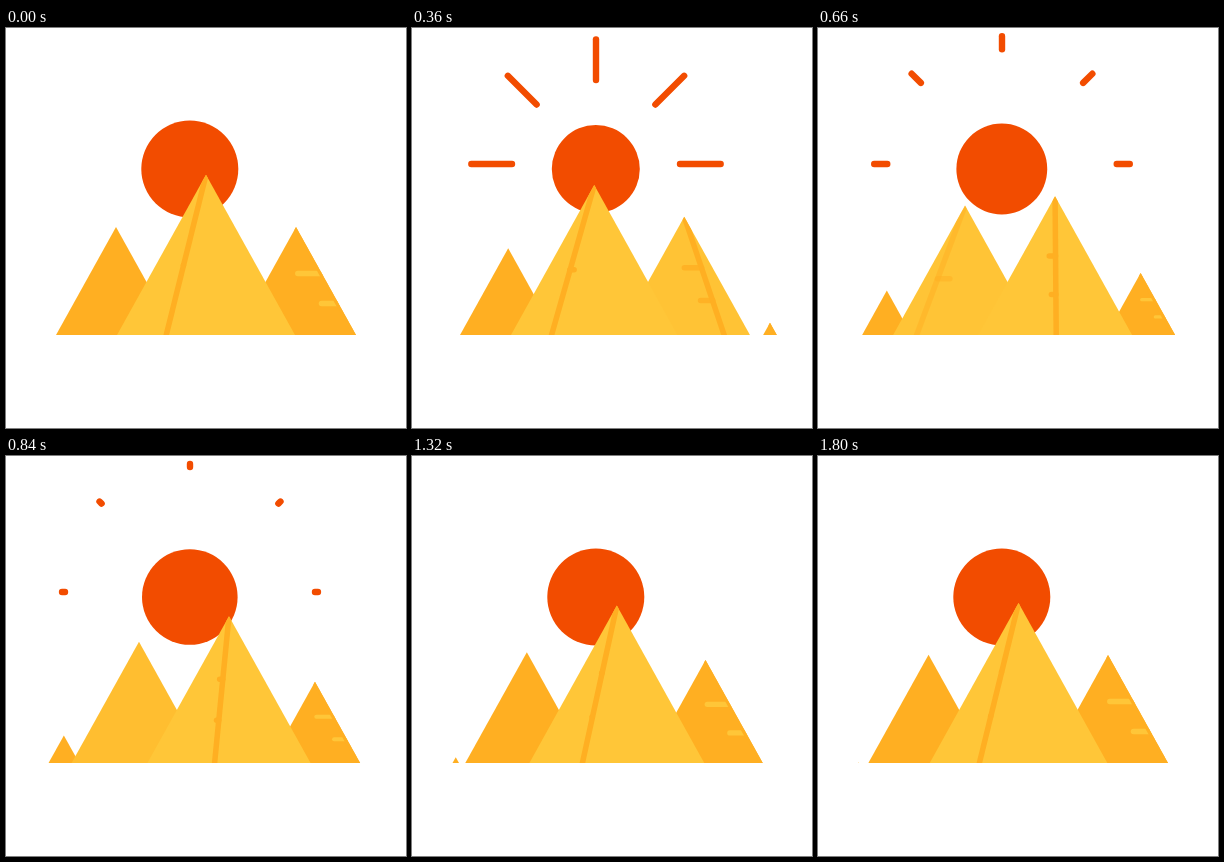
Recreate the animation shown at these times as an HTML page with a canvas. Size 400 by 400 pixels, loop 3.83 s.

```html
<!DOCTYPE html>
<html lang="en">
<head>
<meta charset="utf-8">
<title>Pyramids</title>
<style>
  html, body { margin: 0; width: 100%; height: 100%; overflow: hidden; background: #fff; }
  canvas { display: block; width: 100vmin; height: 100vmin; }
</style>
</head>
<body>
<canvas width="400" height="400"></canvas>
<script>
const ctx = document.querySelector('canvas').getContext('2d');
const LOOP = 3830, MOVE_END = 1800, STEP = 30;
const GROUND = 307, SLOPE = 1.8;
const DARK = [255, 175, 34], LIGHT = [255, 198, 56], SUN = '#f24c00';

const lerp = (a, b, k) => a + (b - a) * k;
const ramp = (t, from, to) => Math.min(1, Math.max(0, (t - from) / (to - from)));
const smooth = x => x * x * (3 - 2 * x);
const mix = (a, b, k) => `rgb(${a.map((v, i) => Math.round(lerp(v, b[i], k)))})`;

// Cubic bezier easing with control points (x1, 0) and (x2, 1)
function ease(x, x1, x2) {
  let low = 0, high = 1;
  for (let i = 0; i < 30; i++) {
    const s = (low + high) / 2, r = 1 - s;
    if (3 * s * r * r * x1 + 3 * s * s * r * x2 + s ** 3 < x) low = s; else high = s;
  }
  return smooth(low);
}

function line(x1, y1, x2, y2, width, color, cap = 'round') {
  ctx.lineWidth = width;
  ctx.strokeStyle = color;
  ctx.lineCap = cap;
  ctx.beginPath();
  ctx.moveTo(x1, y1);
  ctx.lineTo(x2, y2);
  ctx.stroke();
}

// foot: offset of the ridge at the ground; notches: [height, length] per unit size
function pyramid({ x, half, fill, foot, ridge = 1, notches = [], notchColor }) {
  if (half < 0.3) return;
  const height = half * SLOPE, top = GROUND - height, size = half / 60;
  ctx.save();
  ctx.beginPath();
  ctx.moveTo(x, top);
  ctx.lineTo(x + half, GROUND);
  ctx.lineTo(x - half, GROUND);
  ctx.closePath();
  ctx.fillStyle = fill;
  ctx.fill();
  ctx.clip();
  if (foot !== undefined) {
    ctx.globalAlpha = ridge;
    for (const [level, length] of notches) {
      const rise = level * size;
      const start = x + foot * (1 - rise / height);
      line(start, GROUND - rise, start + length, GROUND - rise, 5.5 * Math.min(1, size), notchColor);
    }
    if (ridge) line(x, top, x + foot, GROUND + 1, 5.5, mix(DARK, DARK, 0), 'butt');
  }
  ctx.restore();
}

function drawSun(t) {
  const inner = lerp(40, 128, Math.sin(ramp(t, 40, 1000) * Math.PI / 2));
  const outer = Math.max(inner, 128 - 88 * Math.exp(-t / 110));
  if (t > 0 && t < 1200) {
    for (let i = 0; i < 5; i++) {
      const c = -Math.cos(i * Math.PI / 4), s = -Math.sin(i * Math.PI / 4);
      line(184 + c * inner, 136 + s * inner, 184 + c * outer, 136 + s * outer + 0.01, 6.4, SUN);
    }
  }
  const squeeze = smooth(ramp(t, 0, 240)) - smooth(ramp(t, 480, 960));
  ctx.fillStyle = SUN;
  ctx.beginPath();
  ctx.arc(183.8, 141, 48.5 - 4.5 * squeeze, 0, 7);
  ctx.fill();
}

function draw(t) {
  const p = 0.994 * ease(ramp(t, 0, 1815), 0.32, 0.2);
  const enter = ease(ramp(t, 70, 1830), 0.365, 0.115);
  const brighten = ramp(t, 110, 400), darken = ramp(t, 600, 1250);
  const shrink = (1 - p) ** 1.5;

  ctx.clearRect(0, 0, 400, 400);
  drawSun(t);

  // Leaves on the left, then enters on the right
  pyramid({ x: lerp(110, 40, p), half: lerp(60, 0, p), fill: mix(DARK, DARK, 0) });
  pyramid({
    x: lerp(366.7, 290, enter), half: 60 * enter, fill: mix(DARK, DARK, 0),
    foot: 60 * enter, notches: [[61.5, -24 * enter], [31.5, -17 * enter]],
    notchColor: mix(LIGHT, LIGHT, 0), ridge: 1
  });

  const middleToLeft = {
    x: lerp(200, 110, p), half: lerp(89, 60, p), fill: mix(LIGHT, DARK, darken),
    foot: -40 - 15 * p, ridge: 1 - ramp(t, 520, 800),
    notches: [[47, 21 * p]], notchColor: mix(DARK, DARK, 0)
  };
  const rightToMiddle = {
    x: lerp(290, 200, p), half: lerp(60, 89, p), fill: mix(DARK, LIGHT, brighten),
    foot: 60 - 100 * p, notches: [[61.5, -24 * shrink], [31.5, -17 * shrink]],
    notchColor: mix(LIGHT, DARK, brighten)
  };
  const pair = [rightToMiddle, middleToLeft];
  if (p > 0.5) pair.reverse();
  pair.forEach(pyramid);
}

const begin = performance.now();
function tick() {
  const t = (performance.now() - begin) % LOOP;
  draw(Math.min(MOVE_END, Math.floor(t / STEP) * STEP));
  requestAnimationFrame(tick);
}
tick();
</script>
</body>
</html>
```
